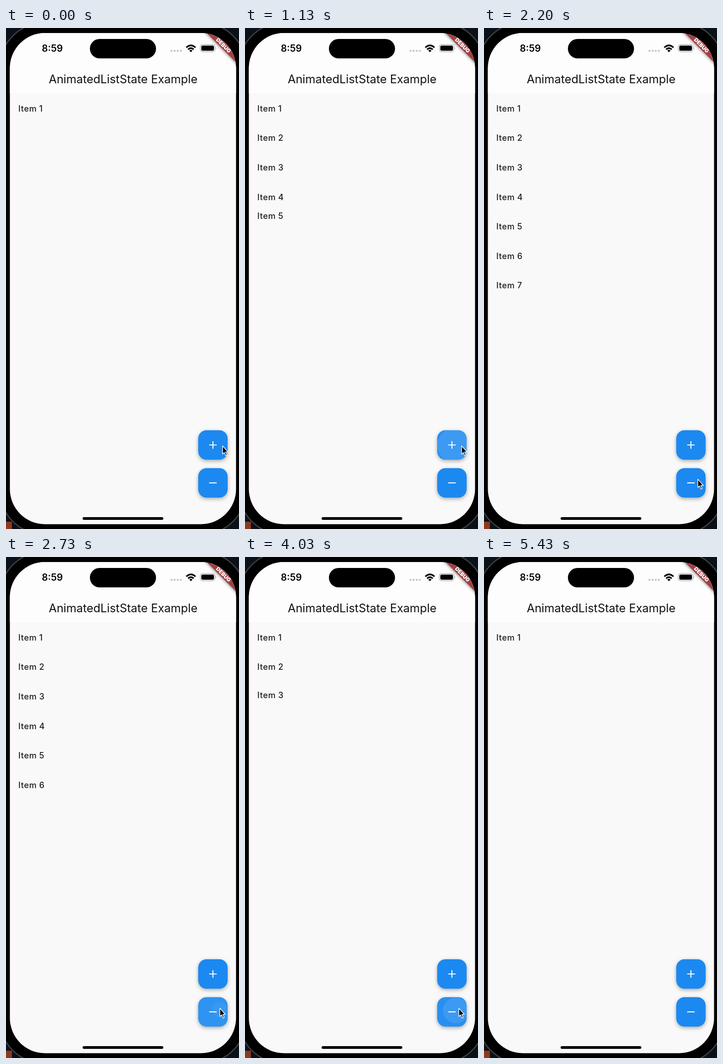
Write an HTML page that moves like this. It is 511 px wide and 1097 px high and loops after 5.46 s.

```html
<!DOCTYPE html>
<html lang="en">
<head>
<meta charset="utf-8">
<title>AnimatedListState Example</title>
<style>
  html, body { margin: 0; width: 100%; height: 100%; overflow: hidden; background: #0b1119; }
  #stage { display: block; width: 100%; height: 100%; font-family: Inter, Roboto, sans-serif; }
  .title { font-size: 25.35px; fill: #111; }
  .item { font-size: 18.2px; font-weight: 500; letter-spacing: .577px; fill: #1d1b20; }
  .clock { font-size: 20.8px; font-weight: 600; }
  .banner { font-size: 11.7px; font-weight: 900; fill: #fff; text-anchor: middle; }
  .fab { fill: #1c89f0; filter: drop-shadow(0 3px 4px rgba(0, 0, 0, .32)); }
  .icon { stroke: #fff; stroke-width: 2.2; fill: none; }
</style>
</head>
<body>
<svg id="stage" viewBox="0 0 511 1097" xmlns="http://www.w3.org/2000/svg">
  <defs>
    <clipPath id="screen"><rect x="8.5" y="11" width="496" height="1075.5" rx="77"/></clipPath>
    <clipPath id="fabClip"><rect x="-32.3" y="-32.3" width="64.6" height="64.6" rx="18.5"/></clipPath>
  </defs>

  <rect y="1081" width="13" height="16" fill="#8b3a1d"/>
  <rect x="-14.5" y="-12" width="542" height="1121.5" rx="100" stroke="#434346" stroke-width="2.4"/>

  <g clip-path="url(#screen)">
    <rect width="511" height="1097" fill="#f9f9f9"/>
    <rect width="511" height="143" fill="#fdfdfd"/>
    <text class="title" x="256.8" y="120.5" text-anchor="middle">AnimatedListState Example</text>
    <g id="list"></g>
    <g transform="translate(477 38) rotate(45)">
      <rect x="-60" y="-7" width="120" height="14" fill="#a44043" style="filter: drop-shadow(0 1px 3px rgba(0,0,0,.5))"/>
      <text class="banner" y="4.2">DEBUG</text>
    </g>
  </g>

  <text class="clock" x="78.5" y="52">8:59</text>
  <rect x="184" y="24" width="145" height="42.5" rx="21.2"/>
  <path d="M363 50H384" stroke="#c6c6c6" stroke-width="4.6" stroke-linecap="round" stroke-dasharray="0 6.8"/>
  <g fill="none" stroke="#000" stroke-width="3.6">
    <path d="M395.5 42.8Q405.5 33.4 415.5 42.8"/>
    <path d="M399.4 47Q405.5 41.2 411.6 47"/>
  </g>
  <path d="M402 49.4Q405.5 46.2 409 49.4L405.5 53Z"/>
  <rect x="426" y="36.3" width="32.4" height="15.8" rx="5" fill="none" stroke="#a5a5a5" stroke-width="1.2"/>
  <rect x="428.3" y="38.6" width="27.8" height="11.2" rx="3.2"/>
  <path d="M460 41.5q2.2 2.7 0 5.4z" fill="#a5a5a5"/>
  <rect x="168" y="1071" width="177" height="6" rx="3"/>

  <g id="fabs"></g>
  <g id="ring" fill="none">
    <circle r="27" stroke="#fff" stroke-width="4"/>
    <circle r="27.2" stroke="#000" stroke-width="1.8"/>
  </g>
  <path id="cursor" d="M0 0V18L3.9 14.4L6.8 21.6L9.5 20.5L6.7 13.5H12Z" stroke="#fff" stroke-width="1.4" stroke-linejoin="round"/>
</svg>

<script>
const LOOP = 5460, ROW = 64.6, LIST_TOP = 143.7;
const ROW_MS = 300, ROW_DELAY = 30, PRESS_MS = 70;

// Release times of each tap; removals run from the last item upward.
const adds = [358, 577, 797, 1016, 1236, 1455];
const removes = [2290, 2720, 3175, 3575, 3970, 4380];

// time, x, y of the pointer tip
const pointerPath = [
  [0, 475, 915], [1800, 475, 915], [2150, 469, 988], [4800, 469, 988],
  [5080, 481, 944], [5350, 481, 944], [5415, 428, 54]
];

const $ = id => document.getElementById(id);
const clamp = v => Math.min(1, Math.max(0, v));
const mix = (a, b, k) => a + (b - a) * k;
const smooth = k => k * k * (3 - 2 * k);

function make(tag, attrs, parent) {
  const el = document.createElementNS("http://www.w3.org/2000/svg", tag);
  set(el, attrs);
  return parent.appendChild(el);
}

function set(el, attrs) {
  for (const key in attrs) el.setAttribute(key, attrs[key]);
}

const rows = Array.from({ length: 7 }, (_, i) => {
  const box = make("svg", { x: 27, width: 200, overflow: "hidden" }, $("list"));
  const label = make("text", { class: "item" }, box);
  label.textContent = `Item ${i + 1}`;
  return { box, label, added: adds[i - 1], removed: removes[6 - i] };
});

function makeFab(y, icon, taps, touchX, touchY) {
  const g = make("g", { transform: `translate(453.8 ${y})` }, $("fabs"));
  const rect = { x: -32.3, y: -32.3, width: 64.6, height: 64.6, rx: 18.5 };
  make("rect", { ...rect, class: "fab" }, g);
  const glow = make("rect", { ...rect, fill: "#fff" }, g);
  const clipped = make("g", { "clip-path": "url(#fabClip)" }, g);
  const ripples = taps.map(() => make("circle", { fill: "#fff" }, clipped));
  make("path", { class: "icon", d: icon }, g);
  return { glow, ripples, taps, touchX, touchY };
}

const fabs = [
  makeFab(913, "M-8.2 0H8.2M0 -8.2V8.2", adds, 20.2, 4),
  makeFab(996, "M-8.2 0H8.2", removes, 15.2, -6)
];

function rowSize(row, t, index) {
  if (index === 0) return 1;
  const grow = clamp((t - row.added - ROW_DELAY) / ROW_MS);
  const shrink = clamp((t - row.removed - ROW_DELAY) / ROW_MS);
  return grow - shrink;
}

function drawList(t) {
  let y = LIST_TOP;
  rows.forEach((row, i) => {
    const height = rowSize(row, t, i) * ROW;
    set(row.box, { y, height, visibility: height > 0 ? "visible" : "hidden" });
    set(row.label, { y: height / 2 + 6.8 });
    y += height;
  });
}

function drawFab(fab, t) {
  let glow = 0;
  fab.taps.forEach((tap, i) => {
    const age = t - tap;
    const k = clamp(age / 225);
    const spread = 1 - Math.pow(1 - k, 1.9);
    const shown = age >= 0 && age < 375;
    if (shown) glow = Math.max(glow, 0.09 * (1 - clamp(age / 140)));
    set(fab.ripples[i], {
      cx: mix(fab.touchX, 0, spread),
      cy: mix(fab.touchY, 0, spread),
      r: mix(13.7, 45.7, spread),
      opacity: shown ? 0.105 * clamp((age + 30) / 100) * clamp((375 - age) / 150) : 0
    });
  });
  set(fab.glow, { opacity: glow });
}

function drawPointer(t) {
  const next = pointerPath.findIndex(p => p[0] > t);
  const cursor = $("cursor"), ring = $("ring");
  const pressed = [...adds, ...removes].some(tap => t >= tap - PRESS_MS && t < tap);
  set(cursor, { visibility: next < 0 ? "hidden" : "visible" });
  set(ring, { visibility: pressed ? "visible" : "hidden" });
  if (next < 0) return;
  const [t0, x0, y0] = pointerPath[next - 1];
  const [t1, x1, y1] = pointerPath[next];
  const k = smooth((t - t0) / (t1 - t0));
  const x = mix(x0, x1, k), y = mix(y0, y1, k);
  set(cursor, { transform: `translate(${x} ${y})` });
  set(ring, { transform: `translate(${x - 1} ${y + 2})` });
}

const start = performance.now();

function draw() {
  const t = (performance.now() - start) % LOOP;
  drawList(t);
  fabs.forEach(fab => drawFab(fab, t));
  drawPointer(t);
  requestAnimationFrame(draw);
}
draw();
</script>
</body>
</html>
```
